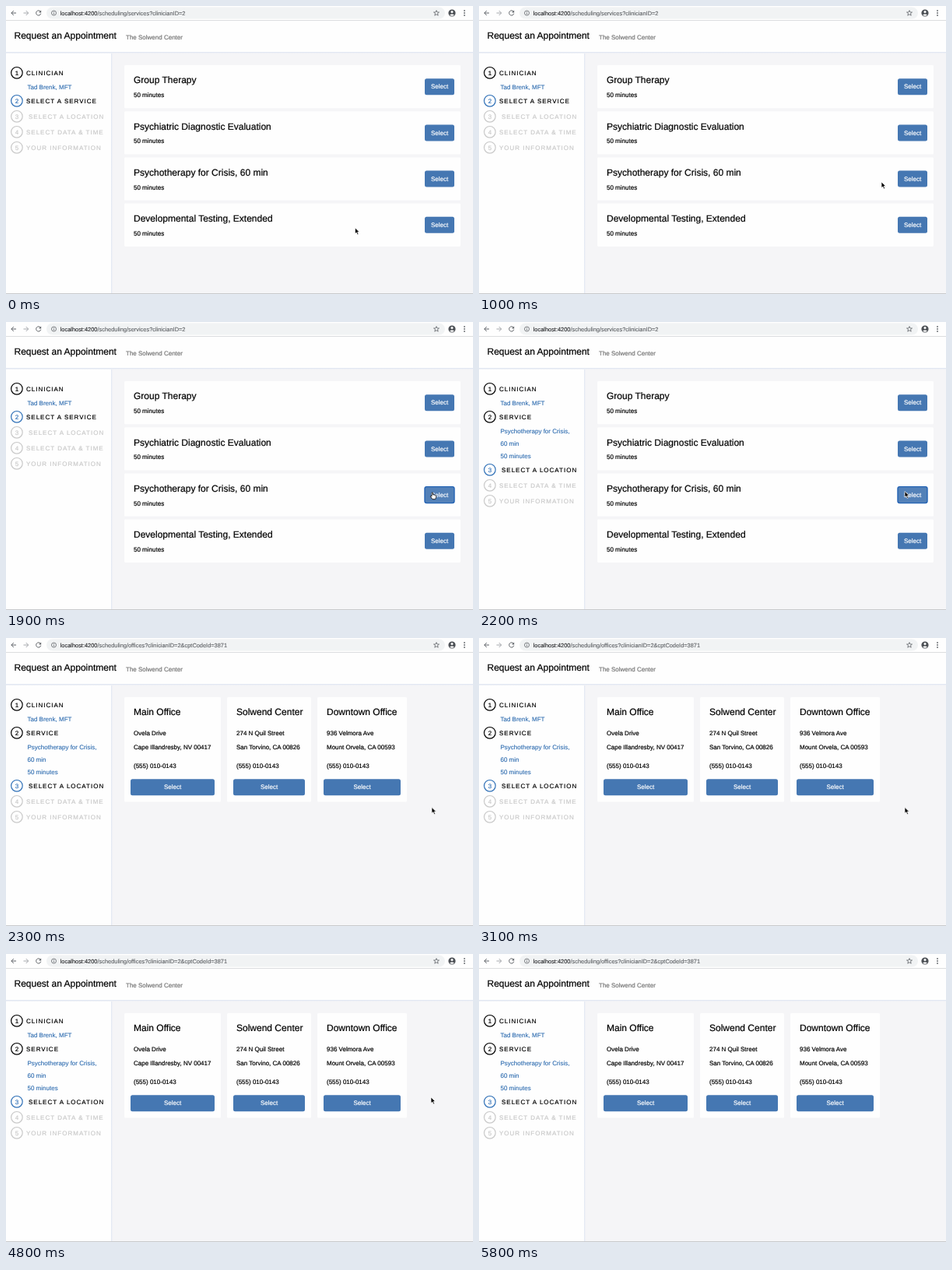
These frames come from a looping animation (600 px wide and 370 px high, 5.9 s). An HTML page:

```html
<!DOCTYPE html>
<html lang="en">
<head>
<meta charset="utf-8">
<title>Request an Appointment</title>
<style>
  html, body { margin: 0; width: 100%; height: 100%; overflow: hidden; background: #f5f5f7; }
  svg { display: block; width: 600px; height: 370px; font: 8px "Liberation Sans", Arial, sans-serif; }
  text { color: #000; fill: currentColor; stroke: currentColor; stroke-width: .2; text-rendering: geometricPrecision; }
  .title { font-size: 12px; }
  .url { font-size: 7.42px; color: #5a5d61; stroke-width: .1; }
  .host { fill: #202124; stroke: #202124; }
  .caps { letter-spacing: 1px; }
  .link { color: #2767ad; stroke-width: .1; }
  .mid { text-anchor: middle; }
  .icon { fill: none; stroke: #5f6368; stroke-width: 1; }
</style>
</head>
<body>
<svg id="stage" viewBox="0 0 600 370">
  <defs>
    <linearGradient id="down" x2="0" y2="1">
      <stop stop-color="#dce3f1"/><stop offset="1" stop-color="#f5f5f7"/>
    </linearGradient>
    <linearGradient id="across">
      <stop stop-color="#dfe6f2"/><stop offset="1" stop-color="#f5f5f7"/>
    </linearGradient>
  </defs>
  <rect width="600" height="370" fill="#f5f5f7"/>
  <rect y="59" width="135" height="311" fill="#fefefe"/>
  <rect x="135" y="59" width="2" height="311" fill="url(#across)"/>
  <rect width="600" height="59" fill="#fefefe"/>
  <rect y="59" width="600" height="2" fill="url(#down)"/>
  <rect y="369" width="600" height="1" fill="#c9cacc"/>

  <g id="toolbar">
    <rect y="18" width="600" height="1" fill="#dcdddf"/>
    <rect x="52" y="1.5" width="512" height="15" rx="7.5" fill="#f1f3f4"/>
    <path class="icon" d="M13 9H6.8M9.8 6L6.8 9L9.8 12"/>
    <path class="icon" style="stroke:#a5a8ac" d="M22.5 9H28.7M25.7 6L28.7 9L25.7 12"/>
    <path class="icon" d="M44.2 7A3.1 3.1 0 1 0 44.8 9.7"/>
    <path d="M45.2 5.4V8.4H42.2Z" fill="#5f6368"/>
    <circle class="icon" cx="61.5" cy="9" r="3" style="stroke-width:.8"/>
    <path class="icon" d="M61.5 8.6V10.7M61.5 7V7.8" style="stroke-width:.8"/>
    <path class="icon" style="stroke-width:.8" d="M553 5.6L554 8H556.5L554.5 9.6L555.2 12.2L553 10.7L550.8 12.2L551.5 9.6L549.5 8H552Z"/>
    <circle cx="573" cy="9" r="4.6" fill="#4d5156"/>
    <circle cx="573" cy="7.6" r="1.5" fill="#fff"/>
    <path d="M570 11.7Q573 8.7 576 11.7Q573 14 570 11.7Z" fill="#fff"/>
    <g fill="#5f6368"><circle cx="589" cy="6" r=".9"/><circle cx="589" cy="9" r=".9"/><circle cx="589" cy="12" r=".9"/></g>
  </g>
  <text class="title" x="10.5" y="42.4">Request an Appointment</text>
  <text x="154" y="42.7" style="color:#777">The Solwend Center</text>

  <g id="before"></g>
  <g id="after"></g>
  <g id="services"></g>
  <g id="offices"></g>
  <path id="arrow" d="M0 0V7.6L1.8 6L3.1 8.9L4.5 8.3L3.2 5.5H5.6Z" fill="#000" stroke="#fff" stroke-width=".7"/>
  <path id="hand" d="M0 .5Q.8-.5 1.5.5V3Q2.4 2.5 3 3.3Q3.9 2.8 4.4 3.6Q5.6 3.3 5.6 4.5V6.3L4.6 8.7H.9L-1.6 5.3Q-1.7 4.2-.6 4.6L0 5.2Z" fill="#fff" stroke="#000" stroke-width=".8"/>
</svg>
<script>
const LOOP = 5900;
const BLUE = '#4577b2', GREY = '#c9c9c9', ACTIVE = '#2f70b7';
const el = id => document.getElementById(id);

const text = (x, y, str, cls = '', color = '') =>
  `<text x="${x}" y="${y}" class="${cls}"${color && ` style="color:${color}"`}>${str}</text>`;

const card = (x, y, w, h) =>
  `<rect x="${x}" y="${y}" width="${w}" height="${h}" rx="1.5" fill="#fefefe"/>`;

const button = (x, y, w, h, id = '') =>
  `<rect ${id && `id="${id}"`} x="${x}" y="${y}" width="${w}" height="${h}" rx="2.5" fill="${BLUE}"/>` +
  text(x + w / 2, y + h / 2 + 2.7, 'Select', 'mid', '#fff');

function step(n, y, label, state, x = 26) {
  const ring = { done: '#000', active: ACTIVE, idle: GREY }[state];
  const ink = state === 'idle' ? GREY : '#000';
  return `<circle cx="13.9" cy="${y - .2}" r="7.3" fill="none" stroke="${ring}" stroke-width="1.2"/>` +
    text(13.9, y + 2.6, n, 'mid', ring) + text(x, y + 2.5, label, 'caps', ink);
}

const link = (y, str) => text(27.5, y + 2.6, str, 'link');

function sidebar(picked) {
  const y = picked ? 190 : 142;
  return step(1, 86, 'CLINICIAN', 'done') + link(104, 'Tad Brenk, MFT') +
    step(2, 122, picked ? 'SERVICE' : 'SELECT A SERVICE', picked ? 'done' : 'active') +
    (picked ? link(140, 'Psychotherapy for Crisis,') + link(156, '60 min') + link(172, '50 minutes') : '') +
    step(3, y, 'SELECT A LOCATION', picked ? 'active' : 'idle', 29) +
    step(4, y + 20, 'SELECT DATA &amp; TIME', 'idle') +
    step(5, y + 40, 'YOUR INFORMATION', 'idle');
}

const url = rest => `<text class="url" x="69.7" y="11.6"><tspan class="host">localhost:4200</tspan>/scheduling/${rest}</text>`;

const services = ['Group Therapy', 'Psychiatric Diagnostic Evaluation',
  'Psychotherapy for Crisis, 60 min', 'Developmental Testing, Extended'];

const offices = [
  [152, 124, 'Main Office', 'Ovela Drive', 'Cape Illandresby, NV 00417'],
  [284, 108, 'Solwend Center', '274 N Quil Street', 'San Torvino, CA 00826'],
  [400, 115, 'Downtown Office', '936 Velmora Ave', 'Mount Orvela, CA 00593']
];

el('before').innerHTML = sidebar(false);
el('after').innerHTML = sidebar(true);

el('services').innerHTML = url('services?clinicianID=2') + services.map((name, i) => {
  const y = 76 + i * 59.2;
  return card(152, y, 432, 55.3) + text(164, y + 23.3, name, 'title') +
    text(164, y + 41.2, '50 minutes') + button(538, y + 17.2, 38, 21, i === 2 ? 'chosen' : '');
}).join('');

el('offices').innerHTML = url('offices?clinicianID=2&amp;cptCodeId=3871') +
  offices.map(([x, w, name, street, city]) =>
    card(x, 76, w, 134.5) + text(x + 12, 99.3, name, 'title') +
    text(x + 12, 125.2, street) + text(x + 12, 142.7, city) +
    text(x + 12, 167.2, '(555) 010-0143') + button(x + 8, 181.2, w - 16, 21)).join('');

// Pointer steps: [time, x, y, shape]
const pointer = [
  [0, 448.5, 285, 'arrow'], [100, 476, 270, 'arrow'], [200, 505, 248, 'arrow'],
  [1000, 517, 226, 'arrow'], [1100, 528, 222, 'arrow'], [1200, 538, 221, 'hand'],
  [1300, 544, 220, 'hand'], [1400, 547, 219, 'hand'], [2200, 547, 217.6, 'arrow'],
  [4700, 547, 212, 'arrow'], [4800, 546, 184, 'arrow'], [4900, 544, 138, 'arrow'],
  [5000, 541, 78, 'arrow'], [5100, 538, 20, 'arrow'], [5200, 0, 0, 'none']
];

const show = (id, on) => el(id).setAttribute('visibility', on ? 'visible' : 'hidden');

function draw(t) {
  const picked = t >= 2000, located = t >= 2300;
  show('before', !picked);
  show('after', picked);
  show('services', !located);
  show('offices', located);

  const hover = t >= 1200, focus = t >= 1700;
  const chosen = el('chosen');
  chosen.setAttribute('fill', focus ? '#5381b8' : hover ? '#3f6ea6' : BLUE);
  chosen.setAttribute('stroke', focus ? '#2463b4' : 'none');
  chosen.setAttribute('stroke-width', 1.4);

  const [, x, y, shape] = pointer.findLast(p => p[0] <= t);
  for (const id of ['arrow', 'hand']) {
    show(id, id === shape);
    el(id).setAttribute('transform', `translate(${x} ${y})`);
  }
}

const start = performance.now();
function tick() {
  draw((performance.now() - start) % LOOP);
  requestAnimationFrame(tick);
}
tick();
</script>
</body>
</html>
```
